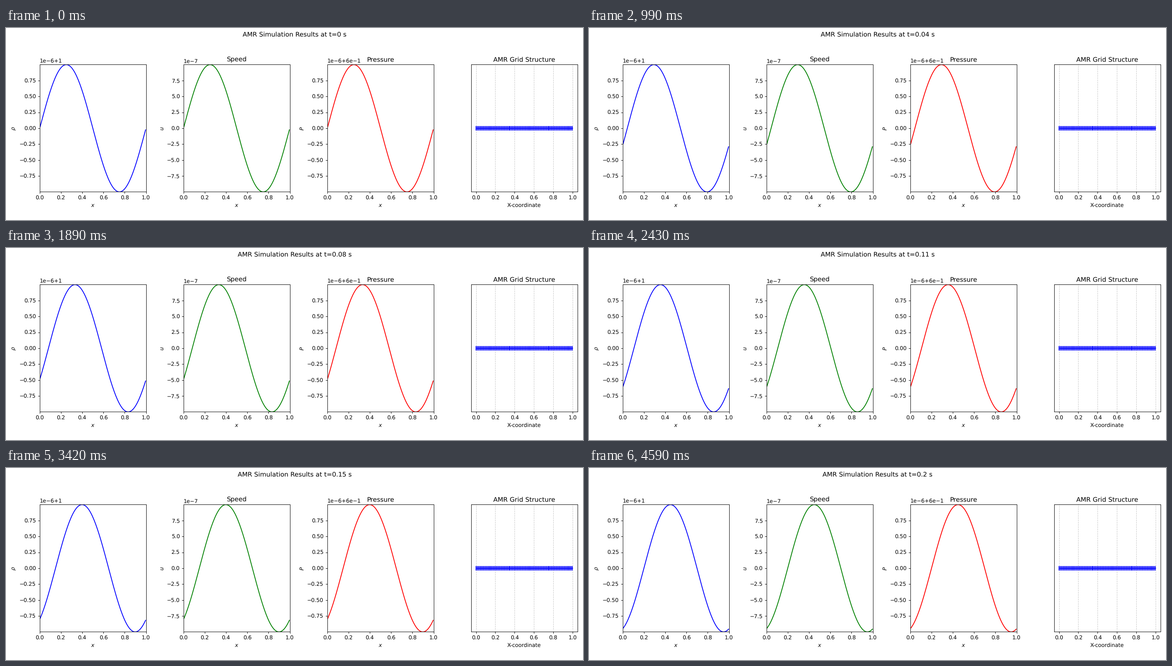
These frames come from a looping animation (1280x427 px, 4.68 s). A matplotlib script:

```python
import matplotlib.pyplot as plt
import numpy as np
from matplotlib.animation import FuncAnimation

WIDTH, HEIGHT = 1280, 427
DPI = WIDTH / 15
FRAMES, INTERVAL = 52, 90
CELLS = 128
DT = 0.5 / CELLS
AMPLITUDE = 1e-6

AXES_LEFT, AXES_STEP, AXES_WIDTH = 74.8, 319, 235.7
AXES_TOP, AXES_BOTTOM = 81.5, 364.5

plt.rcParams["font.family"] = "DejaVu Sans"
plt.rcParams["text.hinting"] = "none"

# The tiny margin keeps the pixel size from truncating downwards.
fig = plt.figure(figsize=((WIDTH + 0.01) / DPI, (HEIGHT + 0.01) / DPI), dpi=DPI)
heading = fig.suptitle("")
x = (np.arange(CELLS) + 0.5) / CELLS


def wave(t):
    return AMPLITUDE * np.sin(2 * np.pi * (x - t))


def add_panel(index, title):
    left = AXES_LEFT + index * AXES_STEP
    ax = fig.add_axes((left / WIDTH, 1 - AXES_BOTTOM / HEIGHT,
                       AXES_WIDTH / WIDTH, (AXES_BOTTOM - AXES_TOP) / HEIGHT))
    ax.set_title(title, y=1.0)
    return ax


def add_wave_panel(index, title, symbol, color, base):
    ax = add_panel(index, title)
    values = base + wave(0)
    line, = ax.plot(x, values, color=color)
    ax.set(xlim=(0, 1), ylim=(values.min(), values.max()),
           xlabel="$x$", ylabel=f"${symbol}$")
    return line, base


def add_grid_panel(index):
    ax = add_panel(index, "AMR Grid Structure")
    ax.set(xlim=(-0.05, 1.05), ylim=(-1, 1), xlabel="X-coordinate", yticks=[])
    ax.grid(axis="x", linestyle="--", alpha=0.7)
    ax.plot([0, 1], [0, 0], color="b")

    # Cell edges sit on a 1500-pixel raster, which gives the uneven rhythm.
    scale = WIDTH / 1500
    left = AXES_LEFT + index * AXES_STEP
    edges = np.linspace(0, 1, CELLS + 1)
    pixels = left + AXES_WIDTH * (edges + 0.05) / 1.1
    snapped = (np.floor(pixels / scale) + 0.5) * scale
    edges = (snapped - left) / AXES_WIDTH * 1.1 - 0.05
    half = 5.0 / (AXES_BOTTOM - AXES_TOP) * 2
    ticks = ax.vlines(edges, -half, half, color="b", linewidth=1)
    ticks.set_snap(False)


waves = [
    add_wave_panel(0, "", r"\rho", "b", 1),
    add_wave_panel(1, "Speed", "u", "g", 0),
    add_wave_panel(2, "Pressure", "P", "r", 0.6),
]
add_grid_panel(3)


def update(step):
    t = step * DT
    shown = round(t, 2) if step else 0
    heading.set_text(f"AMR Simulation Results at t={shown} s")
    for line, base in waves:
        line.set_ydata(base + wave(t))


animation = FuncAnimation(fig, update, frames=FRAMES, interval=INTERVAL,
                          init_func=lambda: update(0), repeat=True,
                          repeat_delay=0)
plt.show()
```
